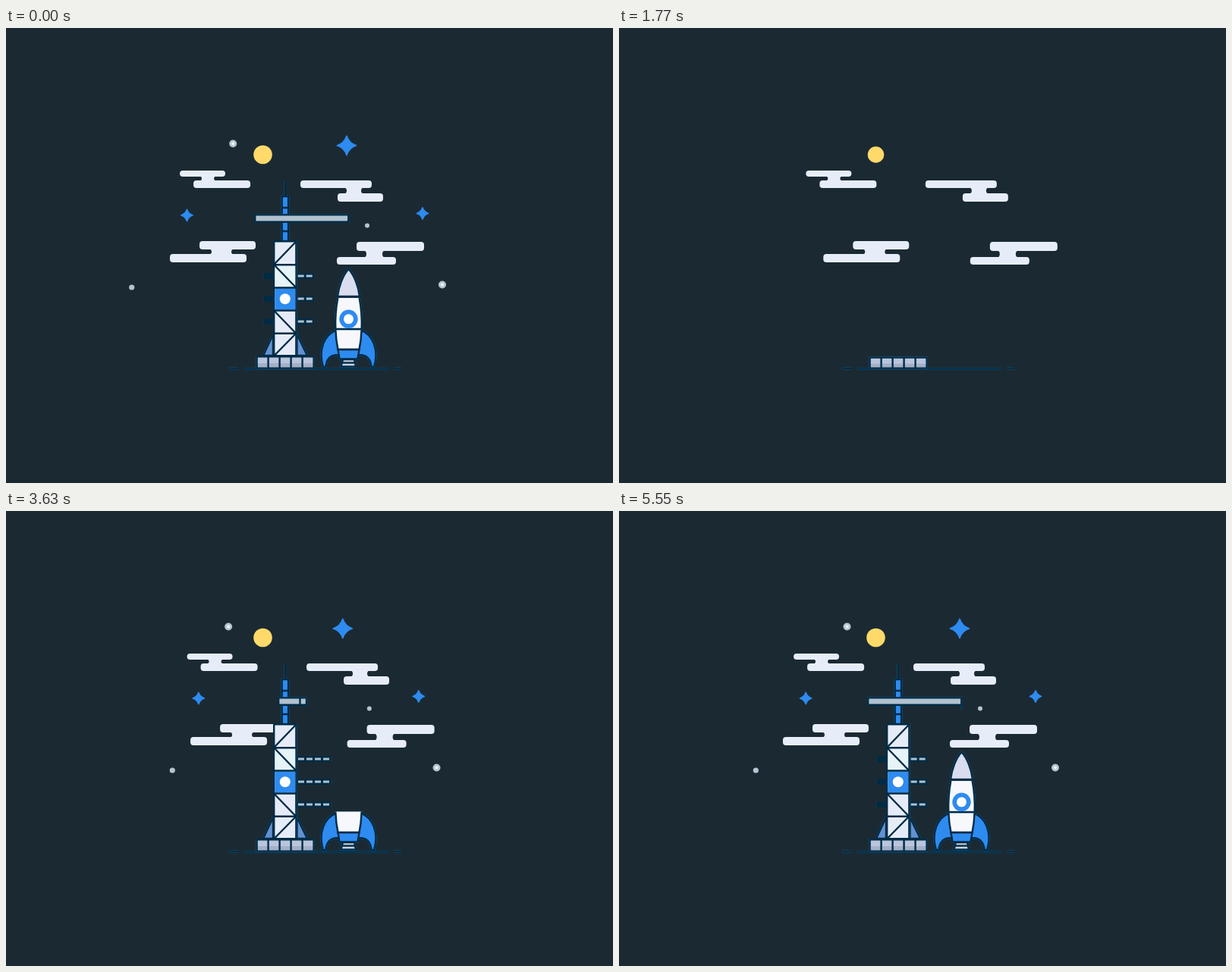
An HTML page for the animation above (5580 ms loop, 800 by 600 pixels).

```html
<!DOCTYPE html>
<html lang="en">
<head>
<meta charset="utf-8">
<title>Rocket launch pad</title>
<style>
  html, body { margin: 0; width: 100%; height: 100%; overflow: hidden; background: #1b2a32; }
  svg { display: block; width: 100vw; height: 100vh; }
  .ink { stroke: #002b45; stroke-width: 2.4; stroke-linejoin: round; }
  .line { fill: none; }
  .rim { filter: drop-shadow(0 0 .7px #2f8bc8); }
</style>
</head>
<body>
<svg id="stage" viewBox="0 0 800 600"></svg>
<script>
const LOOP = 5580, STEP = 30, SETTLED = 5550;
const BLUE = '#2e8bf0', CLOUD = '#e6edf8', GREY = '#b0c2ce', PALE = '#e6ecf7';
const stage = document.getElementById('stage');

const clamp = p => Math.max(0, Math.min(1, p));
const span = (t, a, b) => clamp((t - a) / (b - a));
const swing = p => (1 - Math.cos(Math.PI * p)) / 2;
const easeOut = p => 1 - (1 - p) ** 3;
const mix = (a, b, p) => a + (b - a) * p;
const leave = (t, start) => -2.35e-6 * Math.max(0, t - LOOP - start) ** 3;

const rect = (x, y, w, h, fill, extra = '') =>
  `<rect x="${x}" y="${y}" width="${w}" height="${h}" fill="${fill}" ${extra}/>`;
const path = (d, fill, extra = 'class="ink"') => `<path d="${d}" fill="${fill}" ${extra}/>`;
const line = d => path(d, 'none', 'class="ink line"');
const group = (id, body, extra = '') => `<g id="${id}" ${extra}>${body}</g>`;
const disc = (x, y, r, fill) => `<circle cx="${x}" cy="${y}" r="${r}" fill="${fill}"/>`;

// Two rounded bars joined by a concave neck; bars are [x, y, w, h]
function cloud(top, low, l, r) {
  const bar = b => rect(...b, CLOUD, 'rx="4"');
  const a = top[1] + top[3] - .5, b = low[1] + .5, m = (a + b) / 2;
  const x0 = Math.min(top[0], low[0]);
  const x1 = Math.max(top[0] + top[2], low[0] + low[2]);
  const neck = `M${l - 4} ${a}Q${l} ${a} ${l} ${m}Q${l} ${b} ${l - 4} ${b}` +
    `H${r + 4}Q${r} ${b} ${r} ${m}Q${r} ${a} ${r + 4} ${a}Z`;
  return `<g transform="translate(${-(x0 + x1) / 2} ${-(top[1] + low[1] + low[3]) / 2})">` +
    bar(top) + bar(low) + path(neck, CLOUD, '') + '</g>';
}

function star(r) {
  const c = r * .23, k = r - .8;
  return path(`M0 ${-k}Q${c} ${-c} ${k} 0Q${c} ${c} 0 ${k}Q${-c} ${c} ${-k} 0Q${-c} ${-c} 0 ${-k}Z`,
    BLUE, `stroke="${BLUE}" stroke-width="1.8" stroke-linejoin="round"`);
}

const ringDot = disc(0, 0, 5, '#b4c5d1') + disc(0, 0, 2.2, '#eef3f7');

// x is the resting place, v the drift per ms, on/off the start of entry and exit
const floats = [
  { id: 'cloudA', x: 277, y: 199.5, v: -.0042, on: 1330, off: -85,
    art: cloud([229, 188, 60, 8], [247, 201, 75, 10], 258, 274) },
  { id: 'cloudB', x: 442.5, y: 215, v: -.0042, on: 1250, off: 91,
    art: cloud([388, 201, 94, 10], [437, 218, 60, 11], 449, 468) },
  { id: 'cloudC', x: 272.5, y: 295, v: -.0141, on: 1280, off: 0,
    art: cloud([255, 281, 74, 11], [216, 298, 101, 11], 271, 297) },
  { id: 'cloudD', x: 493.5, y: 297, v: -.0071, on: 1150, off: 172,
    art: cloud([462, 282, 89, 12], [436, 302, 78, 10], 475, 496) },
  { id: 'sun', x: 338.5, y: 167, v: 0, on: 1620, off: 118, art: disc(0, 0, 12.3, '#ffda6a') },
  { id: 'starA', x: 449, y: 155, v: .0027, on: 2200, off: 221, art: star(13.3) },
  { id: 'starB', x: 259, y: 247, v: .0027, on: 1850, off: -206, art: star(8.3) },
  { id: 'starC', x: 549, y: 244.5, v: .0027, on: 2000, off: 230, art: star(8.3) },
  { id: 'dotA', x: 301.2, y: 152.5, v: .0042, on: 2900, off: -95, art: ringDot },
  { id: 'dotB', x: 575, y: 338.5, v: .0039, on: 2700, off: 127, art: ringDot },
  { id: 'dotC', x: 216.2, y: 342, v: -.0016, on: 2250, off: -278, art: disc(0, 0, 3.6, '#b4c5d1') },
  { id: 'dotD', x: 476, y: 260.5, v: -.0015, on: 2300, off: 216, art: disc(0, 0, 3, '#b4c5d1') }
];

// Telescopic arms slide out from behind the column
const arms = [
  { y: 327, on: 2330, back: 4650 },
  { y: 357, on: 2290, back: 4550 },
  { y: 387, on: 2250, back: 4450 }
];
const armArt = y => rect(362, y - 4, 66.5, 8, '#002b45') +
  [385, 396, 407, 418].map(x => rect(x, y - 1.5, 8, 3, GREY)).join('');

const column =
  line('M367.8 201V222') +
  rect(363.7, 222, 8.4, 59, BLUE, 'class="ink"') +
  line('M363 237H373M363 268H373') +
  rect(353.2, 281.2, 29.2, 151, PALE, 'class="ink"') +
  rect(354.4, 313, 26.8, 29, '#e6f4f7') +
  rect(354.4, 343.5, 26.8, 28, BLUE) +
  line('M353 312.2H382M353 342.5H382M353 372.5H382M353 402.8H382' +
    'M354 311L381.5 282.5M354 313L381.5 341.5M354 373.5L381.5 402M354 431.5L381.5 403.5') +
  disc(367.8, 357.3, 7, '#fff');

const props = path('M352 404L339 432H352Z', '#6391d0') + path('M383.5 404L397 432H383.5Z', '#6391d0');

const footing = rect(330.6, 433.2, 75, 15.4, '#b9c5dc') + rect(330.6, 442, 75, 6, '#a5b0c6') +
  rect(330.6, 433.2, 75, 15.4, 'none', 'class="ink"') +
  line('M345.6 433V448M360.6 433V448M375.6 433V448M390.6 433V448');

const crane = rect(0, 246.4, 0, 9.4, GREY, 'id="beam" class="ink"') +
  '<path id="cap" d="M0 246V256" class="ink line"/>';

const fin = path('M435 398.5C420 404 411 424 418 447H421.5C422 436 429 429.500 439 431.500Z', BLUE);
const rocketBase = fin + `<g transform="matrix(-1 0 0 1 903 0)">${fin}</g>` +
  path('M444 437H459L461 446.500H441.500Z', '#c9d1de') + line('M442 441.500H460') +
  path('M434.300 396.500Q434.800 411 437.500 424H465.500Q468.200 411 468.700 396.500', '#f7f8fb') +
  path('M437.500 424H465.500L463.500 436.500H439.500Z', BLUE);
const rocketBody = path('M437.300 356Q433.500 376 434.300 397H468.700Q469.500 376 465.700 356', '#f7f8fb');
const rocketNose = path('M451.500 318C444 326 438.500 341 437 354H466C464.500 341 459 326 451.500 318Z', '#d9ddef');

// top is the resting height of the joint the rope holds
const parts = [
  { id: 'base', top: 396, land: 3460, rise: 120, art: rocketBase },
  { id: 'body', top: 356, land: 4405, rise: 140, art: rocketBody },
  { id: 'nose', top: 317, land: 5350, rise: 222, art: rocketNose }
];
const HOOK_TOP = 256, HANG = 278;

stage.innerHTML =
  '<defs><clipPath id="reveal"><rect id="shade" x="300" y="190" width="160" height="262"/></clipPath></defs>' +
  floats.map(f => group(f.id, f.art)).join('') +
  group('ground', '<g class="rim">' + line('M313 449.500H504M294.500 449H306M511 449H521') + '</g>') +
  group('tower',
    arms.map((a, i) => `<g clip-path="inset(0)">${group('arm' + i, armArt(a.y), 'class="rim"')}</g>`).join('') +
    group('props', props, 'class="rim"') +
    group('column', '<g class="rim">' + column + '</g>', 'clip-path="url(#reveal)"') +
    group('footing', footing, 'class="rim"') +
    group('crane', crane, 'class="rim"')) +
  group('rocket',
    '<path id="rope" class="ink line rim"/>' +
    parts.map(p => group(p.id, p.art, 'class="rim"')).join('') +
    group('badge', disc(0, 0, 12.2, BLUE) + disc(0, 0, 6.500, '#fff')));

const el = {};
stage.querySelectorAll('[id]').forEach(n => el[n.id] = n);
const move = (id, x, y = 0, sx = 1, sy = sx) =>
  el[id].setAttribute('transform', `translate(${x} ${y}) scale(${sx} ${sy})`);
const show = (id, on) => el[id].style.display = on ? '' : 'none';
const attrs = (id, set) => Object.entries(set).forEach(([k, v]) => el[id].setAttribute(k, v));

// 0 = crane reaching over the rocket, 1 = turned towards the viewer
function craneTurn(t) {
  let k = swing(span(t, 2620, 2800));
  parts.forEach((p, i) => {
    k -= swing(span(t, p.land - 520, p.land - 250));
    if (i < 2) k += swing(span(t, p.land, p.land + 170));
  });
  return clamp(k);
}

function drawFloats(t) {
  for (const f of floats) {
    const s = easeOut(span(t, f.on, f.on + 300));
    const x = f.x + f.v * (Math.min(t, SETTLED) - SETTLED) + leave(t, f.off);
    show(f.id, s > 0);
    move(f.id, x, f.y, s);
  }
}

function drawTower(t) {
  move('tower', leave(t, 124));
  const g = easeOut(span(t, 1110, 1400));
  show('ground', g > 0);
  move('ground', 407.5 * (1 - g) + leave(t, 158), 0, g, 1);

  const f = easeOut(span(t, 1660, 1860));
  show('footing', f > 0);
  move('footing', 0, 449 * (1 - f), 1, f);

  const rise = swing(span(t, 1750, 2250));
  show('column', rise > 0);
  attrs('shade', { y: mix(434, 190, rise) });

  const p = easeOut(span(t, 2250, 2450));
  show('props', p > 0);
  move('props', 0, 432 * (1 - p), 1, p);

  arms.forEach((a, i) => {
    const out = easeOut(span(t, a.on, a.on + 220));
    const back = swing(span(t, a.back, a.back + 250));
    show('arm' + i, out > 0);
    move('arm' + i, -45 * (1 - out) - 22.3 * back);
  });
}

function drawCrane(t) {
  const k = craneTurn(t), open = easeOut(span(t, 2150, 2420));
  const left = mix(368, mix(328.2, 359.2, k), open);
  const right = mix(368, mix(451.5, 396, k), open);
  show('crane', open > 0);
  attrs('beam', { x: left, width: right - left });
  move('cap', right - 8.500 * k);
  return mix(451.5, 391, k);
}

function drawRocket(t, hookX) {
  move('rocket', leave(t, 124));
  let ropeEnd = HOOK_TOP;
  for (const p of parts) {
    const grow = easeOut(span(t, p.land - 650, p.land - 525));
    const y = mix(HANG, p.top, swing(span(t, p.land - 250, p.land)));
    const x = t < p.land ? hookX : 451.5;
    show(p.id, grow > 0);
    el[p.id].setAttribute('transform', `translate(${x} ${y}) scale(${grow}) translate(-451.5 ${-p.top})`);
    if (grow > 0 && t < p.land + p.rise) {
      ropeEnd = t < p.land ? mix(HOOK_TOP, y, grow)
        : mix(p.top, HOOK_TOP, span(t, p.land, p.land + p.rise));
    }
  }
  show('rope', ropeEnd > HOOK_TOP + .5);
  attrs('rope', { d: `M${hookX} ${HOOK_TOP}V${ropeEnd}` });

  const b = easeOut(span(t, 5200, 5430));
  show('badge', b > 0);
  move('badge', 451.5, 383.8, b);
}

// The exit runs across the loop point, so early times continue the previous pass
function draw(ms) {
  const now = Math.floor((ms % LOOP) / STEP) * STEP;
  const t = now < 1000 ? now + LOOP : now;
  const gone = now >= 900 && now < 1110;
  stage.style.visibility = gone ? 'hidden' : 'visible';
  drawFloats(t);
  drawTower(t);
  drawRocket(t, drawCrane(t));
}

let begin = null;
function tick(now) {
  if (begin === null) begin = now;
  draw(now - begin);
  requestAnimationFrame(tick);
}
draw(0);
requestAnimationFrame(tick);
</script>
</body>
</html>
```
